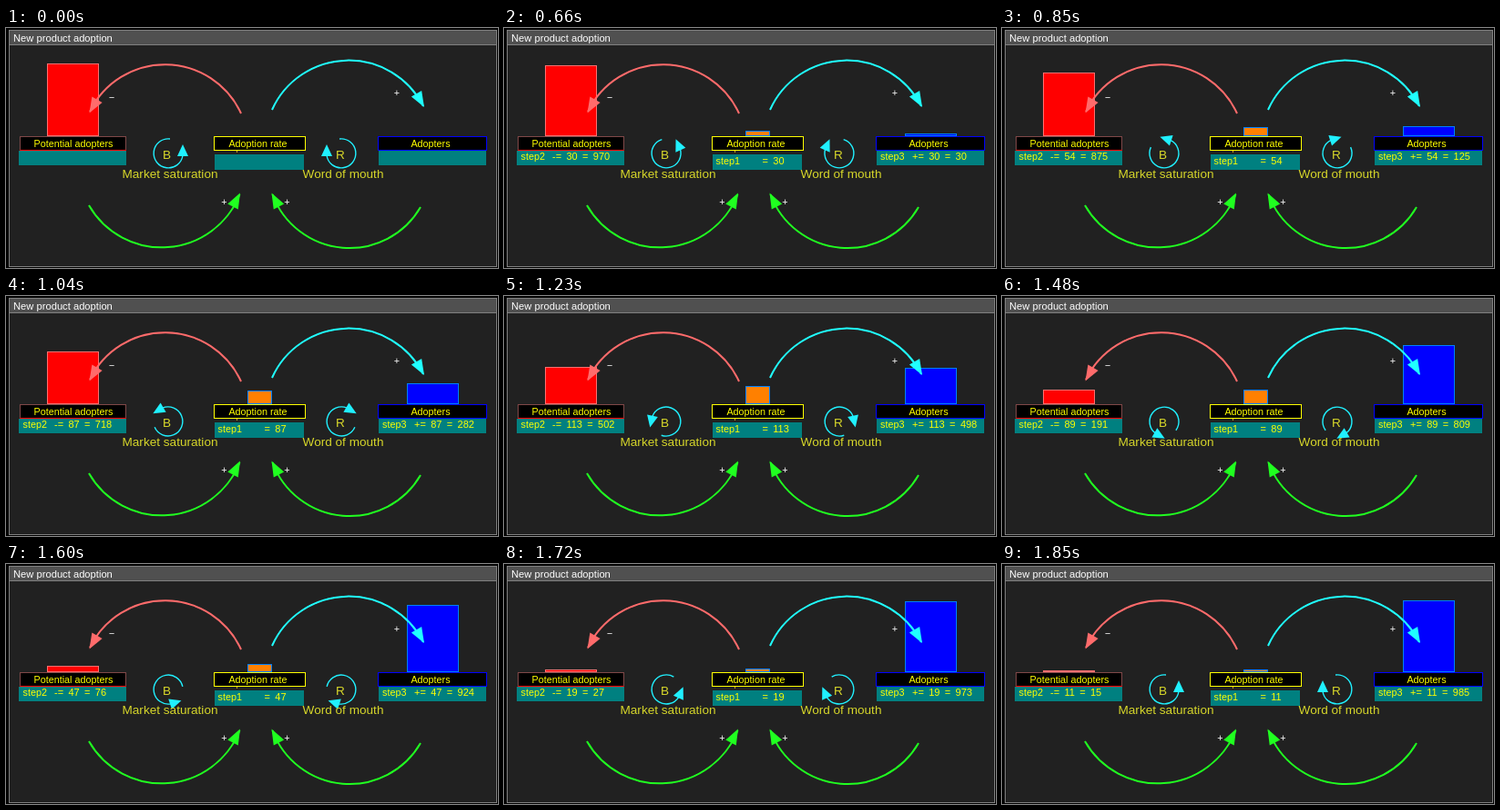
Animation, 540 px wide and 264 px high, one loop 2.31 s. Source, as an HTML page:

```html
<!DOCTYPE html>
<html lang="en">
<head>
<meta charset="utf-8">
<title>New product adoption</title>
<style>
  html, body { margin: 0; width: 100%; height: 100%; overflow: hidden; background: #000; }
  svg { display: block; width: 540px; height: 264px; }
  text { font-family: "Liberation Sans", Arial, sans-serif; font-size: 10.8px; fill: #ff0; white-space: pre; }
  .white { fill: #fff; }
  .mid { text-anchor: middle; }
  .loop-name { font-size: 13.6px; fill: #d6d62a; }
  .sum { font-size: 11px; word-spacing: 2.3px; }
  .teal { fill: #008080; }
  .link { fill: none; stroke-width: 2; }
  .crisp { shape-rendering: crispEdges; }
</style>
</head>
<body>
<svg viewBox="0 0 540 264">
  <g class="crisp">
    <rect x="3.5" y="2.5" width="535" height="260" fill="#212121" stroke="#808080"/>
    <rect x="4" y="3" width="534" height="15" fill="#505050"/>
    <path d="M3 18.5H539" stroke="#808080"/>
  </g>
  <text class="white" x="8" y="15" style="font-size:11.2px">New product adoption</text>

  <g class="crisp">
    <rect id="potentialBar" x="45.5" width="56" fill="#f00" stroke="#ff7070"/>
    <rect id="rateBar" x="265.5" width="26" fill="#ff8000" stroke="#0080ff"/>
    <rect id="adopterBar" x="440.5" width="56" fill="#00f" stroke="#0080ff"/>

    <rect class="teal" x="14" y="135" width="118" height="16"/>
    <rect class="teal" x="229" y="139" width="98" height="17"/>
    <rect class="teal" x="409" y="135" width="118" height="16"/>
    <rect x="15.5" y="119.5" width="116" height="15" stroke="#804848"/>
    <path d="M15 134.5H132" stroke="#f00"/>
    <rect x="228.5" y="119.5" width="100" height="15" stroke="#ff0"/>
    <rect x="408.5" y="119.5" width="119" height="15" stroke="#00f"/>
    <rect x="253" y="135" width="1" height="2" fill="#c8a020"/>
  </g>

  <text class="mid" x="74" y="131">Potential adopters</text>
  <text class="mid" x="276.5" y="131">Adoption rate</text>
  <text class="mid" x="466" y="131">Adopters</text>

  <g id="sums">
    <text x="18.5" y="145">step2</text><text id="potentialSum" class="sum" x="53" y="145"></text>
    <text x="232.5" y="150">step1</text><text id="rateSum" class="sum" x="283.5" y="150"></text>
    <text x="413" y="145">step3</text><text id="adopterSum" class="sum" x="448" y="145"></text>
  </g>

  <defs>
    <path id="head" d="M0 0L-17 -6.5V6.5Z"/>
    <g id="spinner">
      <path d="M2 -16A16 16 0 1 0 16 2" fill="none" stroke="#20f0ff" stroke-width="1.4"/>
      <path d="M16 -10L22 3H10Z" fill="#20f0ff"/>
    </g>
  </defs>

  <path class="link" stroke="#ff6b6b" d="M258 94A91.6 91.6 0 0 0 92 92"/>
  <use href="#head" fill="#ff6b6b" transform="translate(91.5 93.5) rotate(120)"/>
  <path class="link" stroke="#20ffff" d="M292 90A92 92 0 0 1 458 86"/>
  <use href="#head" fill="#20ffff" transform="translate(459 87) rotate(60)"/>
  <path class="link" stroke="#20ff20" d="M91 195A92 92 0 0 0 256.5 183"/>
  <use href="#head" fill="#20ff20" transform="translate(257 181.5) rotate(-62)"/>
  <path class="link" stroke="#20ff20" d="M455 197A90 90 0 0 1 292.5 183"/>
  <use href="#head" fill="#20ff20" transform="translate(291.5 181.5) rotate(-118)"/>

  <text class="white mid" x="116" y="80">−</text>
  <text class="white mid" x="429" y="75">+</text>
  <text class="white mid" x="239.5" y="195">+</text>
  <text class="white mid" x="308.5" y="195">+</text>

  <use id="spinB" href="#spinner"/>
  <use id="spinR" href="#spinner"/>
  <text class="loop-name mid" x="176.5" y="144">B</text>
  <text class="loop-name mid" x="367" y="144">R</text>
  <text class="loop-name mid" x="180" y="165">Market saturation</text>
  <text class="loop-name mid" x="370" y="165">Word of mouth</text>
</svg>
<script>
  const LOOP = 2310, MARKET = 1000, INNOVATION = 0.03, IMITATION = 0.4, BASE = 118;
  const times = [0, 660, 790, 850, 980, 1040, 1170, 1230, 1290, 1350, 1480, 1540, 1600, 1660, 1720, 1850];
  const el = id => document.getElementById(id);

  // Bass diffusion, one state per step
  const states = [{ rate: 0, adopters: 0 }];
  while (states.length < times.length) {
    const { adopters } = states[states.length - 1];
    const rate = (MARKET - adopters) * (INNOVATION + IMITATION * adopters / MARKET);
    states.push({ rate, adopters: adopters + rate });
  }

  function setBar(id, height) {
    const h = Math.round(height), bar = el(id);
    bar.setAttribute("y", BASE + 0.5 - h);
    bar.setAttribute("height", h);
    bar.style.display = h ? "" : "none";
  }

  function show(step) {
    const { rate, adopters } = states[step];
    const joined = Math.ceil(adopters), left = MARKET - joined, flow = Math.round(rate);
    setBar("potentialBar", left * 0.079);
    setBar("rateBar", rate / 6);
    setBar("adopterBar", joined * 0.079);
    el("sums").style.display = step ? "" : "none";
    el("potentialSum").textContent = `-= ${flow} = ${left}`;
    el("rateSum").textContent = `= ${flow}`;
    el("adopterSum").textContent = `+= ${flow} = ${joined}`;
    const turn = -24 * step;
    el("spinB").setAttribute("transform", `translate(178 138) rotate(${turn})`);
    el("spinR").setAttribute("transform", `translate(368 138) scale(-1 1) rotate(${turn})`);
  }

  let shown = -1;
  const start = performance.now();
  function tick() {
    const t = (performance.now() - start) % LOOP;
    const step = times.filter(at => at <= t).length - 1;
    if (step !== shown) show(shown = step);
    requestAnimationFrame(tick);
  }
  tick();
</script>
</body>
</html>
```
